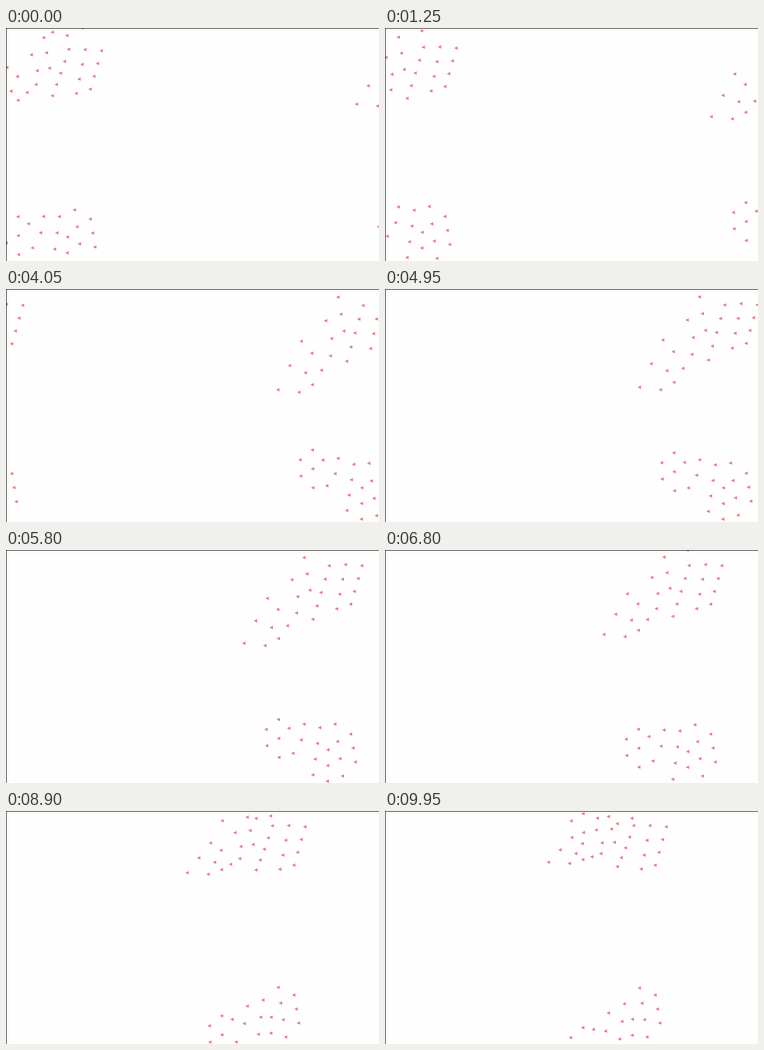
Animation, 640 px wide and 400 px high, one loop 10000 ms. Source, as an HTML page with a canvas:

```html
<!DOCTYPE html>
<html lang="en">
<head>
<meta charset="utf-8">
<title>Flock</title>
<style>
  html, body { margin: 0; width: 100%; height: 100%; overflow: hidden; background: #fefefe; }
  canvas { display: block; }
</style>
</head>
<body>
<canvas id="stage" width="640" height="400"></canvas>
<script>
const W = 640, H = 400, LOOP = 10000, STEP = 50;
const MID = 5.8;      // seconds; the pose the ranks describe
const SPEED = 33.3;   // px per second, leftwards
const ctx = document.getElementById('stage').getContext('2d');

// Evenly spaced ranks: from x, y, to x, y, count. Negative y wraps to the bottom.
const ranks = [
  [408, 160, 448, 83, 3], [444, 164, 466, 102, 3],
  [467, 152, 498, 108, 3], [500, 80, 490, 51, 2],
  [521, 69, 511, 13, 3], [526, 119, 554, 27, 5],
  [567, 101, 582, 25, 4], [591, 93, 610, 27, 4],
  [447, -64, 446, -92, 2], [468, -44, 467, -109, 3],
  [492, -51, 485, -94, 2], [506, -74, 511, -101, 2],
  [526, -14, 538, -95, 4], [551, -3, 552, -57, 3],
  [577, -12, 564, -101, 4], [599, -36, 591, -84, 3]
];

const mix = (a, b, u) => a + (b - a) * u;
const wrap = (v, size) => ((v % size) + size) % size;
const clamp = v => Math.min(1, Math.max(0, v));

const birds = ranks.flatMap(([x1, y1, x2, y2, n]) =>
  Array.from({ length: n }, (_, i) => {
    const u = i / (n - 1);
    return { x: mix(x1, x2, u), y: mix(y1, y2, u) };
  }));

const swing = t => 1 - Math.cos(0.36 * (t + 2));

// Leaders swing apart, then together; followers only settle upwards.
function place({ x, y }, t) {
  const lead = clamp((570 - x) / 100);
  const pull = y > 0 ? -y / 3 : 60;
  const turn = swing(t) - swing(0);
  const settle = 0.36 * Math.min(0, t) ** 2;
  const slow = 0.6 * Math.max(0, t) ** 2;
  return [
    wrap(x - SPEED * t + slow, W),
    wrap(y + lead * pull * turn + (1 - lead) * settle, H)
  ];
}

function drawBird(x, y) {
  ctx.beginPath();
  ctx.moveTo(x - 3, y);
  ctx.lineTo(x + 3, y - 3);
  ctx.lineTo(x + 3, y + 3);
  ctx.fill();
}

function draw(time) {
  const t = Math.floor((time % LOOP) / STEP) * STEP / 1000 - MID;

  ctx.fillStyle = '#fefefe';
  ctx.fillRect(0, 0, W, H);

  ctx.fillStyle = '#e87d87';
  for (const bird of birds) drawBird(...place(bird, t));

  ctx.fillStyle = '#1a1a1a';
  ctx.fillRect(0, 0, W, 1);
  ctx.fillRect(0, 0, 1, H);
}

let start;
function tick(now) {
  start ??= now;
  draw(now - start);
  requestAnimationFrame(tick);
}
draw(0);
requestAnimationFrame(tick);
</script>
</body>
</html>
```
